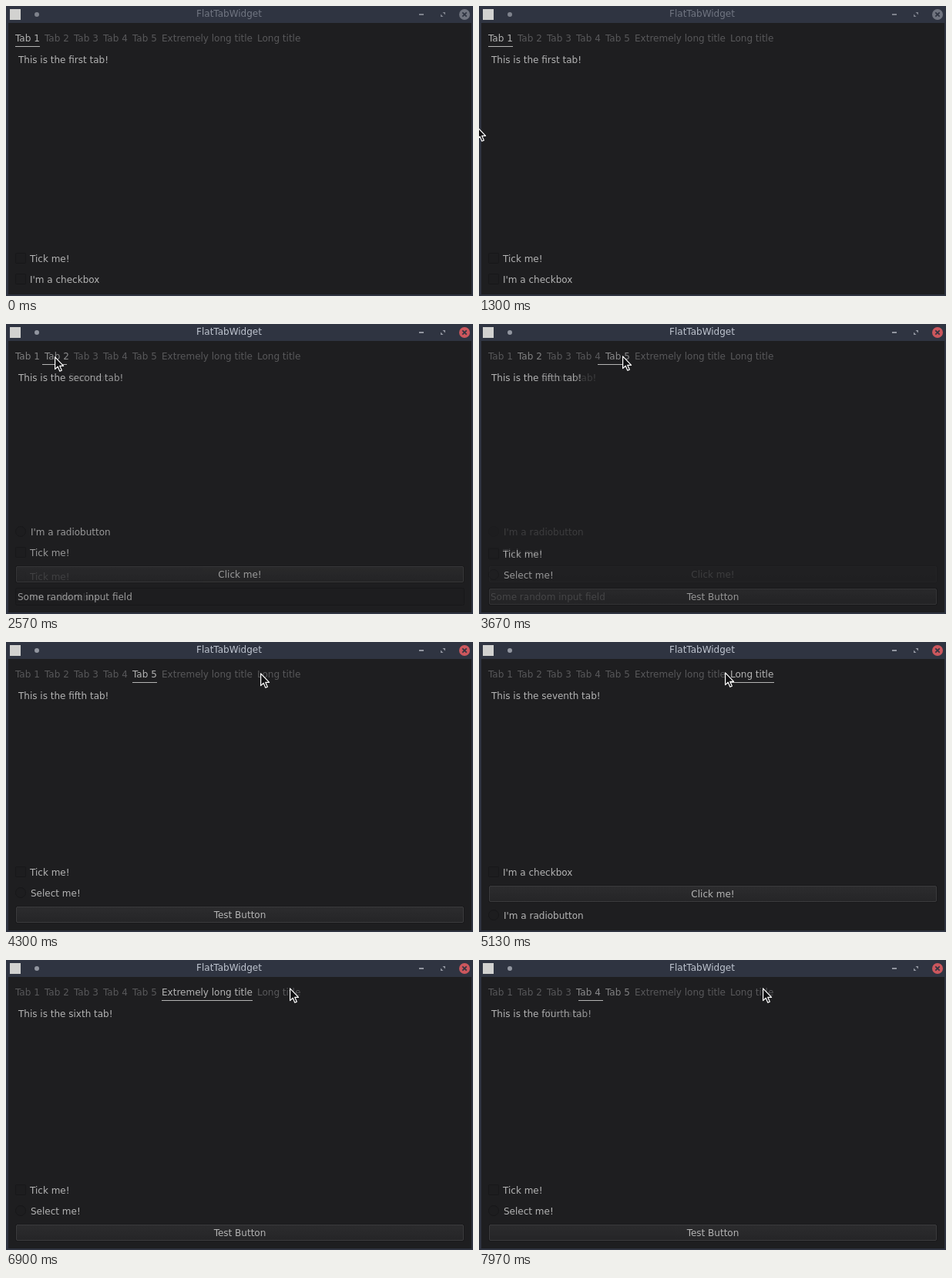
Animation of 606 by 376 pixels, one loop 8000 ms. Source, as an HTML page:

```html
<!DOCTYPE html>
<html lang="en">
<head>
<meta charset="utf-8">
<title>FlatTabWidget</title>
<style>
  html, body { margin: 0; width: 100%; height: 100%; overflow: hidden; background: #2f3441; }
  svg { display: block; width: 606px; height: 376px; }
  text { font: 12px "DejaVu Sans", sans-serif; fill: #b4b4b4; white-space: pre; }
</style>
</head>
<body>
<svg id="stage" viewBox="0 0 606 376">
  <defs>
    <linearGradient id="face" x1="0" y1="0" x2="0" y2="1">
      <stop offset="0" stop-color="#2c2c2e"/>
      <stop offset="1" stop-color="#252527"/>
    </linearGradient>
  </defs>
  <rect width="606" height="376" fill="#2f3441"/>
  <rect x="3" y="22" width="601" height="352" fill="#1e1e20"/>
  <rect x="5" y="4" width="14" height="14" fill="#d2d2d0"/>
  <text id="caption" x="289.5" y="14" text-anchor="middle">FlatTabWidget</text>
  <g id="controls">
    <circle cx="40" cy="11" r="3"/>
    <rect x="536" y="10" width="6" height="2"/>
    <path d="M566.5 8h3.5v3.5zM564 10.5v3.5h3.5z"/>
  </g>
  <circle id="close" cx="595" cy="11" r="7"/>
  <path d="M592.3 8.3l5.4 5.4M597.7 8.3l-5.4 5.4" stroke="#2f3441" stroke-width="1.7"/>
  <g id="pages"></g>
  <g id="tabs"></g>
  <rect id="line" y="52" height="1" fill="#b4b4b4"/>
  <path id="cursor" d="M.6 .8V16.6L4.2 13.2 6.8 19.2 9.3 18.1 6.7 12.3H11.6Z"
        fill="#101012" stroke="#fff" stroke-width="1.2" stroke-linejoin="round"/>
</svg>
<script>
const LOOP = 8000, FADE = 300;
const $ = id => document.getElementById(id);
const clamp = v => Math.max(0, Math.min(1, v));
const mix = (a, b, p) => a + (b - a) * p;
const blend = (a, b, p) => `rgb(${a.map((v, i) => Math.round(mix(v, b[i], p)))})`;

function add(parent, tag, attrs, text) {
  const el = document.createElementNS("http://www.w3.org/2000/svg", tag);
  for (const k in attrs) el.setAttribute(k, attrs[k]);
  if (text) el.textContent = text;
  return parent.appendChild(el);
}

const label = (g, x, y, s, anchor = "start") => add(g, "text", { x, y, "text-anchor": anchor }, s);
const dark = { fill: "#1d1d1f", stroke: "#171719" };

// Widgets take their text baseline as y.
const check = s => (g, y) => {
  add(g, "rect", { x: 12.5, y: y - 11.5, width: 13, height: 13, rx: 1, ...dark });
  label(g, 31, y, s);
};
const radio = s => (g, y) => {
  add(g, "circle", { cx: 19, cy: y - 5, r: 6.5, ...dark });
  label(g, 32, y, s);
};
const button = s => (g, y) => {
  add(g, "rect", { x: 12.5, y: y - 15.5, width: 582, height: 22, rx: 2, fill: "none", stroke: "#19191b" });
  add(g, "rect", { x: 13.5, y: y - 14.5, width: 580, height: 20, rx: 1.5, fill: "url(#face)", stroke: "#3b3b3d" });
  label(g, 303.5, y, s, "middle");
};
const field = s => (g, y) => {
  add(g, "rect", { x: 12.5, y: y - 15.5, width: 582, height: 22, rx: 2, ...dark });
  label(g, 15, y, s);
};

const trio = [[check("Tick me!"), 303], [radio("Select me!"), 330], [button("Test Button"), 358]];
const rows = [
  [[check("Tick me!"), 332], [check("I'm a checkbox"), 359]],
  [[radio("I'm a radiobutton"), 274], [check("Tick me!"), 301], [button("Click me!"), 329],
   [field("Some random input field"), 358]],
  trio, trio, trio, trio,
  [[check("I'm a checkbox"), 303], [button("Click me!"), 331], [radio("I'm a radiobutton"), 359]]
];
const ordinals = ["first", "second", "third", "fourth", "fifth", "sixth", "seventh"];
const pages = rows.map((list, i) => {
  const g = add($("pages"), "g", {});
  add(g, "rect", { x: 3, y: 57, width: 601, height: 317, fill: "#1e1e20" });
  label(g, 16, 74, `This is the ${ordinals[i]} tab!`);
  list.forEach(([widget, y]) => widget(g, y));
  return g;
});

const tabs = ["Tab 1", "Tab 2", "Tab 3", "Tab 4", "Tab 5", "Extremely long title", "Long title"]
  .map((s, i) => {
    const x = i < 6 ? 12 + 38 * i : 326;
    return { x, w: [32, 32, 32, 32, 32, 118, 57][i], el: label($("tabs"), x, 46, s) };
  });

// [time, tab]
const switches = [[-FADE, 0], [2395, 1], [3505, 4], [4525, 6], [6600, 5], [7415, 4], [7805, 3]];
// [time, x, y]
const path = [
  [1270, -6, 157], [1560, 83, 118], [1830, 74, 87], [2070, 58, 49], [2200, 58, 42],
  [2470, 58, 42], [2570, 63, 42], [3070, 199, 41], [3250, 199, 41], [3300, 186, 41],
  [3670, 186, 41], [4050, 275, 38], [4300, 330, 40], [4370, 323, 40], [4900, 323, 40],
  [5130, 319, 39], [5270, 311, 40], [5370, 311, 40], [5700, 350, 45], [6000, 393, 46],
  [6200, 393, 46], [6400, 370, 35], [6500, 368, 36], [LOOP, 368, 36]
];

// Tangent at a key: flat at holds and turning points.
function slope(i, c) {
  const a = path[i - 1], k = path[i], b = path[i + 1];
  if (!a || !b) return 0;
  const u = (k[c] - a[c]) / (k[0] - a[0]), v = (b[c] - k[c]) / (b[0] - k[0]);
  return u * v > 0 ? 2 * u * v / (u + v) : 0;
}

function along(t, c) {
  const i = path.findIndex(k => k[0] > t) - 1;
  const a = path[i], b = path[i + 1], d = b[0] - a[0], p = (t - a[0]) / d, q = 1 - p;
  return a[c] * q * q * (1 + 2 * p) + b[c] * p * p * (3 - 2 * p)
    + d * p * q * (slope(i, c) * q - slope(i + 1, c) * p);
}

function render(t) {
  let n = 0;
  while (n + 1 < switches.length && switches[n + 1][0] <= t) n++;
  const [start, now] = switches[n], old = n ? switches[n - 1][1] : now;
  const p = clamp((t - start) / FADE), ease = 1 - (1 - p) ** 3;

  pages.forEach((g, i) => {
    const shown = i === now || (i === old && p < 1);
    g.style.display = shown ? "" : "none";
    g.style.opacity = i === now ? 1 : (1 - p) ** 2;
  });
  if (old !== now && p < 1 && $("pages").lastChild !== pages[old]) $("pages").append(pages[old]);

  tabs.forEach((tab, i) => {
    const lit = i === now ? (old === now ? 1 : p) : i === old ? 1 - p : 0;
    tab.el.style.fill = blend([88, 88, 90], [180, 180, 180], lit);
  });
  $("line").setAttribute("x", Math.round(mix(tabs[old].x, tabs[now].x, ease)));
  $("line").setAttribute("width", Math.round(mix(tabs[old].w, tabs[now].w, ease)));

  const focus = clamp((t - 2395) / 150);
  $("caption").style.fill = blend([112, 117, 129], [190, 196, 207], focus);
  $("controls").style.fill = blend([126, 130, 140], [146, 150, 160], focus);
  $("close").style.fill = blend([112, 116, 127], [204, 87, 93], focus);

  const visible = t >= path[0][0];
  $("cursor").style.display = visible ? "" : "none";
  if (visible) $("cursor").setAttribute("transform",
    `translate(${Math.round(along(t, 1))} ${Math.round(along(t, 2))})`);
}

function tick() {
  render(performance.now() % LOOP);
  requestAnimationFrame(tick);
}
tick();
</script>
</body>
</html>
```
